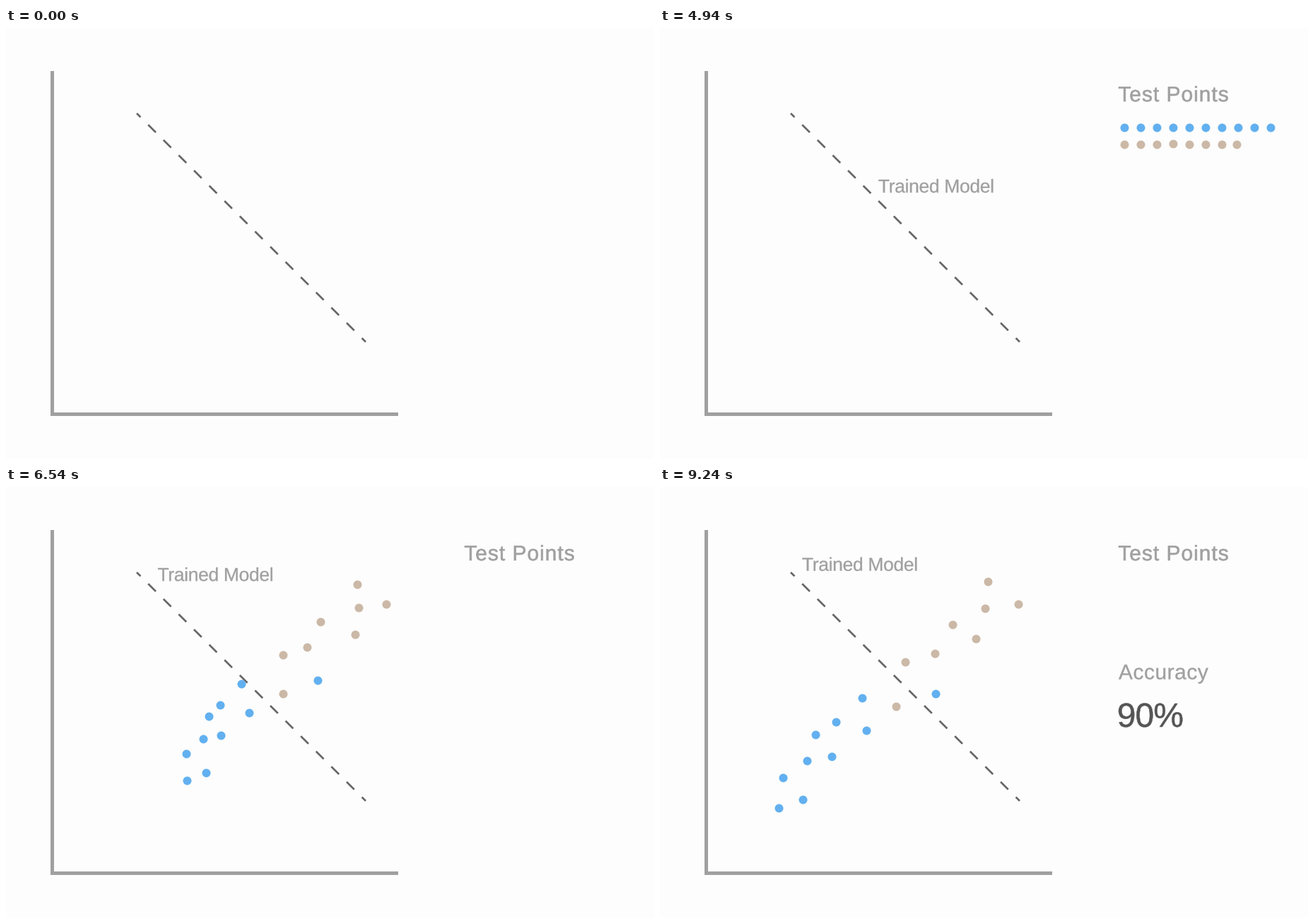
Animation, 917 px wide and 611 px high, one loop 9.26 s. Source, as a matplotlib script:

```python
import numpy as np
import matplotlib.pyplot as plt
from matplotlib.animation import FuncAnimation
from matplotlib.collections import LineCollection
from matplotlib.patches import PathPatch, Rectangle
from matplotlib.path import Path
from matplotlib.textpath import TextPath
from matplotlib.transforms import Affine2D

W, H, DPI = 917, 611, 64
STEP, LOOP = 20, 9260
GREY, DARK = "#a0a0a0", "#555555"
PX = 72 / DPI  # one pixel in points
FONT = {"family": "Liberation Sans"}

# Timeline in ms: start, duration
LABEL_IN = 1200, 980
POINTS_IN = 3060, 1440
MOVE = 4900, 2662
SCORE_IN = 7560, 1040

# End places, listed in the order of the starting rows
BLUE_END = [(286, 299), (249, 333), (292, 345), (243, 382), (220, 351),
            (208, 388), (390, 293), (174, 412), (202, 443), (168, 455)]
TAN_END = [(414, 195), (389, 236), (347, 248), (464, 134),
           (507, 166), (460, 172), (334, 311), (447, 215)]
LABEL_SHIFT = np.array([-108, -114.5])

fig = plt.figure(figsize=(W / DPI, H / DPI), dpi=DPI, facecolor="#fdfdfd")
ax = fig.add_axes([0, 0, 1, 1])
ax.set_xlim(0, W)
ax.set_ylim(H, 0)
ax.axis("off")

U = np.linspace(0, 1, 400)
EASE_X = 3 * (1 - U) ** 2 * U * 0.357 + 3 * (1 - U) * U ** 2 * 0.257 + U ** 3
EASE_Y = 3 * (1 - U) * U ** 2 + U ** 3


def progress(t, span):
    """Eased 0..1 position of time t inside a (start, duration) span."""
    start, length = span
    return float(np.interp((t - start) / length, EASE_X, EASE_Y))


def text(string, left, base, size, track, color, weight):
    """Tracked text whose ink starts at left and stands on base."""
    glyphs = []
    for i, char in enumerate(string):
        if char == " ":
            continue
        glyph = TextPath((0, 0), char, size=size, prop=FONT)
        run = TextPath((0, 0), string[:i + 1], size=size, prop=FONT)
        x = run.get_extents().x1 - glyph.get_extents().x1 + i * track
        glyphs.append(Path(glyph.vertices * [1, -1] + [x, base], glyph.codes))
    first = glyphs[0].get_extents().x0
    shape = Path.make_compound_path(*glyphs)
    shape = Path(shape.vertices + [left - first, 0], shape.codes)
    patch = PathPatch(shape, facecolor=color, edgecolor=color,
                      lw=weight * PX, zorder=3)
    return ax.add_patch(patch)


def dots(starts, color):
    return ax.scatter(*starts.T, s=(12 * PX) ** 2, color=color, lw=0, zorder=4)


# Axes of the chart
ax.add_patch(Rectangle((63, 61), 5, 489, color=GREY, lw=0))
ax.add_patch(Rectangle((63, 545.3), 491.5, 4.7, color=GREY, lw=0))

# Dashed boundary: equal dashes and gaps, half a dash at both ends
line_start, line_len, period = np.array([185, 121]), 324, 21.6
dashes = []
for k in range(16):
    ends = np.clip([k * period - period / 4, k * period + period / 4], 0, line_len)
    dashes.append([line_start + e for e in ends])
ax.add_collection(LineCollection(dashes, colors="#666666", linewidths=2.7 * PX,
                                 capstyle="butt", zorder=2))

label = text("Trained Model", 309.5, 233.3, 26.5, -0.35, GREY, 0.3)
title = text("Test Points", 649, 104, 30, 0.97, GREY, 0.6)
score_name = text("Accuracy", 649, 272.5, 30, 0.5, GREY, 0.3)
score = text("90%", 649, 340, 48, -0.9, DARK, 0.5)

blue_start = np.array([(657 + 23 * i, 140.5) for i in range(10)])
tan_start = np.array([(657 + 23 * i, 164.5) for i in range(8)])
tan_start[-1, 0] -= 2
blue_end, tan_end = np.array(BLUE_END) + 0.3, np.array(TAN_END) + 0.3
blue = dots(blue_start, "#62b0f0")
tan = dots(tan_start, "#cbb8a6")


def draw(frame):
    t = frame * STEP
    label.set_alpha(progress(t, LABEL_IN))
    shown = progress(t, POINTS_IN)
    for part in (title, blue, tan):
        part.set_alpha(shown)
    scored = progress(t, SCORE_IN)
    for part in (score_name, score):
        part.set_alpha(scored)

    p = progress(t, MOVE)
    label.set_transform(Affine2D().translate(*(LABEL_SHIFT * p)) + ax.transData)
    blue.set_offsets(blue_start + (blue_end - blue_start) * p)
    tan.set_offsets(tan_start + (tan_end - tan_start) * p)
    return label, title, blue, tan, score_name, score


anim = FuncAnimation(fig, draw, frames=LOOP // STEP, interval=STEP,
                     repeat=True, repeat_delay=0)
plt.show()
```
